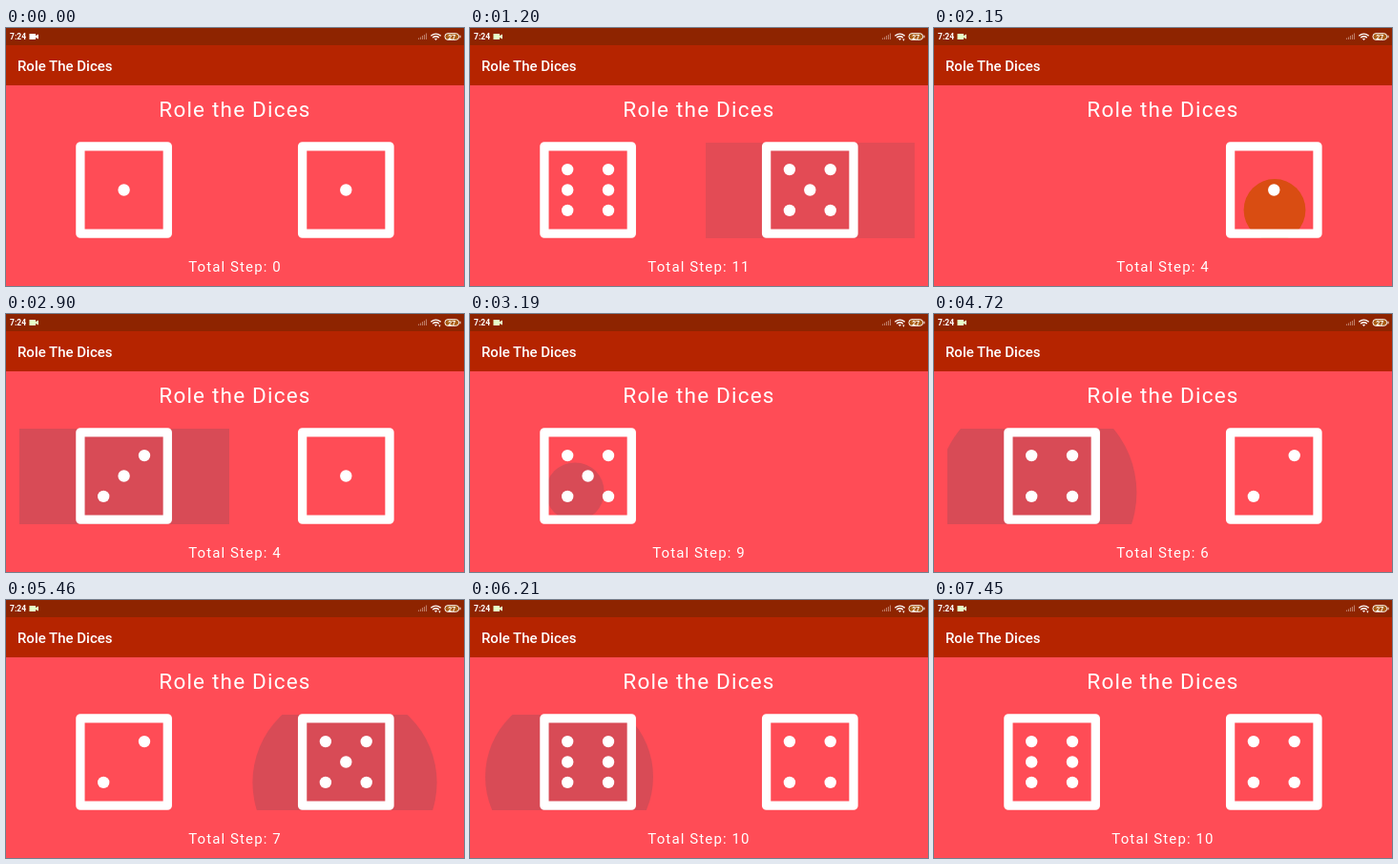
An HTML page that plays this animation: 480x270 px, repeating every 7490 ms.

```html
<!DOCTYPE html>
<html lang="en">
<head>
<meta charset="utf-8">
<title>Role The Dices</title>
<style>
  html, body { margin: 0; width: 100%; height: 100%; overflow: hidden; background: #ff4c56; }
  svg { display: block; width: 100vw; height: 100vh; }
  text { font-family: Roboto, sans-serif; fill: #fff; }
  .centered { text-anchor: middle; }
  .frame { fill: none; stroke: #fff; stroke-width: 9.3; stroke-linejoin: round; }
</style>
</head>
<body>
<svg viewBox="0 0 480 270">
  <defs>
    <clipPath id="leftButton"><rect x="14" y="120" width="220" height="100"/></clipPath>
    <clipPath id="rightButton"><rect x="247" y="120" width="219" height="100"/></clipPath>
  </defs>
  <rect width="480" height="270" fill="#ff4c56"/>
  <rect width="480" height="60" fill="#b52400"/>
  <rect width="480" height="18" fill="#8e2400"/>

  <text x="4" y="12" font-size="8.5" font-weight="700">7:24</text>
  <path id="camera" d="M24.5 6h6.5v2l3-1.6v5.2l-3-1.6v2h-6.5z"/>
  <path d="M432.5 12v-1.5m2 1.5v-2.5m2 2.5v-4m2 4v-5m2 5v-6.5" stroke="#bd7a64" stroke-width="1.1"/>
  <g fill="none" stroke="#fff" stroke-width="1.4">
    <path d="M445.3 8.2q5.2-4.2 10.4 0M447.2 10.1q3.3-2.6 6.6 0"/>
    <path d="M449.2 11.2h2.6l-1.3 1.5z" fill="#fff" stroke-width=".5"/>
  </g>
  <path id="traffic" d="M453.2 11.5h2.4l-1.2 2.2z" fill="#fff"/>
  <rect x="460" y="5.7" width="14.6" height="6.6" rx="3" fill="#a85b10" stroke="#fff" stroke-width="1"/>
  <path d="M476 7.7v2.6" stroke="#fff"/>
  <text class="centered" x="467.3" y="11.5" font-size="7" font-weight="700">27</text>

  <text x="12" y="45.2" font-size="15" font-weight="500">Role The Dices</text>
  <text class="centered" x="240" y="93.3" font-size="22.5" letter-spacing="1.2">Role the Dices</text>

  <g clip-path="url(#leftButton)"><circle class="splash"/></g>
  <g clip-path="url(#rightButton)"><circle class="splash"/></g>
  <g class="die" transform="translate(123.6 169.5)"></g>
  <g class="die" transform="translate(356.3 169.5)"></g>
  <text id="total" class="centered" x="240" y="255" font-size="15" letter-spacing="1.12"></text>
</svg>
<script>
const LOOP = 7490, LOAD_TIME = 100, LEFT = 0, RIGHT = 1;
const DIM = '#d84b56', ORANGE = '#d94d12';

// Every tap rolls both dice and starts a splash on the touched button.
const tap = (at, side, faces, x, y, speed, life = 400, color = DIM) =>
  ({ at, side, faces, x, y, speed, life, color });
const taps = [
  tap(540, LEFT, [5, 2], 112, 186, .5),
  tap(930, RIGHT, [6, 5], 356, 190, .5, 350),
  tap(1320, LEFT, [2, 6], 110, 186, .5, 290),
  tap(2070, RIGHT, [3, 1], 357, 190.5, .4, 500, ORANGE),
  tap(2770, LEFT, [3, 1], 120, 176, 1.2, 370),
  tap(3140, LEFT, [5, 4], 110, 186, .6),
  tap(3720, RIGHT, [6, 1], 354.5, 193, .54, 290),
  tap(4470, LEFT, [4, 2], 108, 187, .416, 380),
  tap(4850, LEFT, [3, 6], 108, 187, .6, 360),
  tap(5300, RIGHT, [2, 5], 355, 191, .6, 380),
  tap(5680, RIGHT, [5, 3], 355, 191, .6, 360),
  tap(6120, LEFT, [6, 4], 104, 185, .967, 420)
];

// A face seen for the first time stays blank while its image loads.
const seen = new Set([1]);
for (const roll of taps) {
  roll.loading = roll.faces.map(face => !seen.has(face));
  roll.faces.forEach(face => seen.add(face));
}

const diagonal = [[1, -1], [-1, 1]], antiDiagonal = [[-1, -1], [1, 1]];
function pips(face) {
  return [
    ...(face % 2 ? [[0, 0]] : []),
    ...(face > 1 ? diagonal : []),
    ...(face > 3 ? antiDiagonal : []),
    ...(face === 6 ? [[-1, 0], [1, 0]] : [])
  ];
}

const dieMarkup = face => '<rect class="frame" x="-45.7" y="-45.7" width="91.4" height="91.4"/>' +
  pips(face).map(([x, y]) => `<circle cx="${x * 21.4}" cy="${y * 21.4}" r="6.2" fill="#fff"/>`).join('');

const dice = document.querySelectorAll('.die');
const splashes = document.querySelectorAll('.splash');
const total = document.getElementById('total');
const camera = document.getElementById('camera');
const traffic = document.getElementById('traffic');
const between = (t, from, to) => t >= from && t < to;
const idle = { at: 0, faces: [1, 1], loading: [false, false] };

function drawDie(die, face, visible) {
  if (die.dataset.face !== String(face)) {
    die.dataset.face = face;
    die.innerHTML = dieMarkup(face);
  }
  die.style.visibility = visible ? 'visible' : 'hidden';
}

function drawSplash(circle, side, t) {
  const active = taps.findLast(s => s.side === side && between(t, s.at, s.at + s.life));
  if (!active) return circle.setAttribute('opacity', 0);
  const age = t - active.at;
  const fadeStart = active.life * .68;
  circle.setAttribute('cx', active.x);
  circle.setAttribute('cy', active.y);
  circle.setAttribute('r', age * active.speed);
  circle.setAttribute('fill', active.color);
  circle.setAttribute('opacity', Math.min(1, (active.life - age) / (active.life - fadeStart)));
}

function render() {
  const t = performance.now() % LOOP;
  const roll = taps.findLast(s => s.at <= t) || idle;
  dice.forEach((die, i) =>
    drawDie(die, roll.faces[i], !(roll.loading[i] && t - roll.at < LOAD_TIME)));
  splashes.forEach((circle, side) => drawSplash(circle, side, t));
  const sum = roll === idle ? 0 : roll.faces[0] + roll.faces[1];
  total.textContent = `Total Step: ${sum}`;
  camera.setAttribute('fill', t < 540 ? '#fff' : '#e6ffc8');
  const busy = between(t, 900, 1780) || between(t, 2770, 4470) || t >= 5000;
  traffic.style.visibility = busy ? 'visible' : 'hidden';
  requestAnimationFrame(render);
}
render();
</script>
</body>
</html>
```
